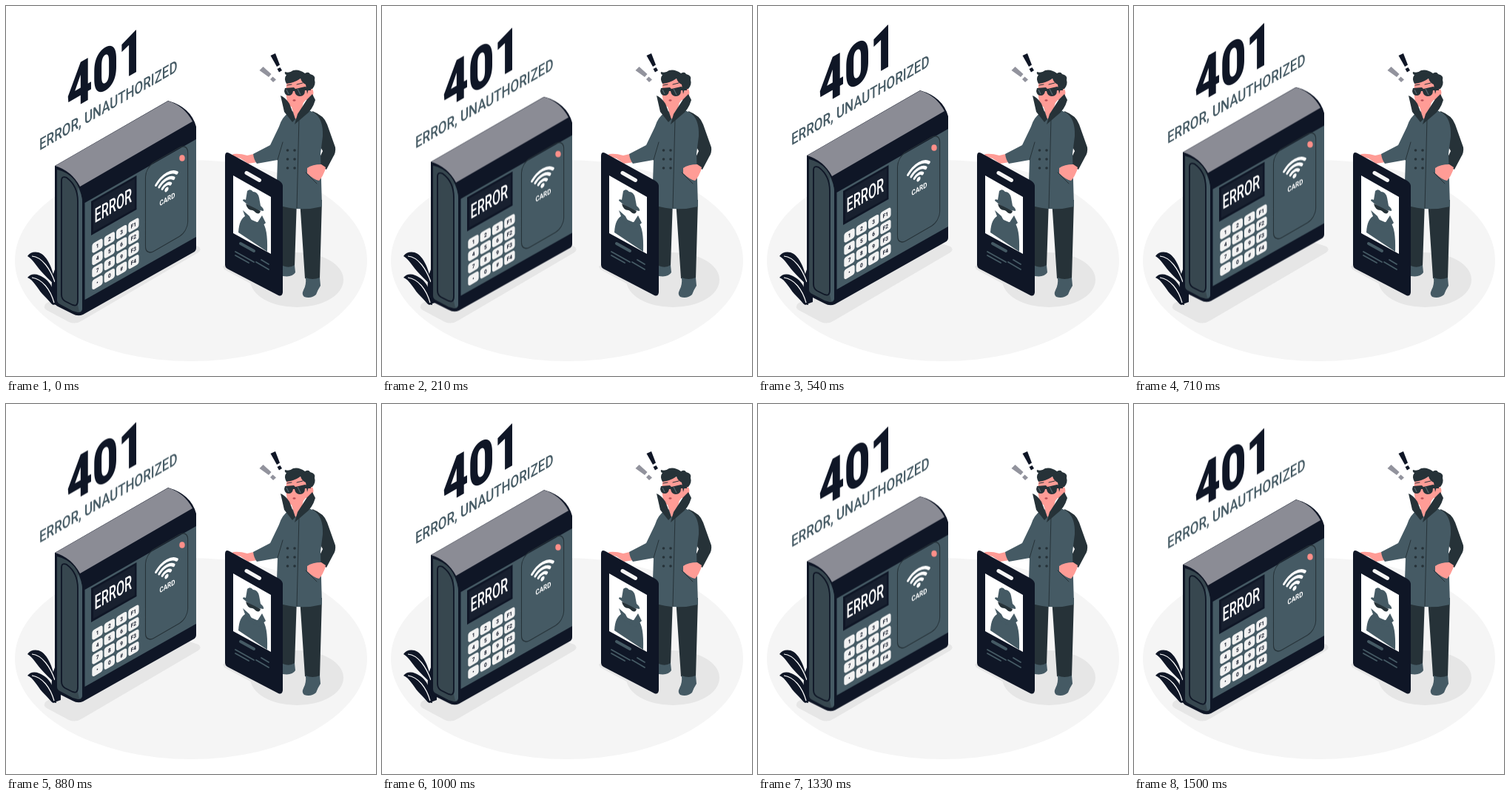
An HTML page that plays this animation: 500x500 px, repeating every 1.54 s.

```html
<!DOCTYPE html>
<html lang="en">
<head>
<meta charset="utf-8">
<title>401</title>
<style>
html, body { margin: 0; width: 100%; height: 100%; overflow: hidden; background: #fff; }
svg { display: block; width: 100vw; height: 100vh; }
text { font-family: Roboto, Arial, sans-serif; font-weight: 500; }
.navy { fill: #0f1626; }
.ink { fill: #263238; }
.slate { fill: #455a64; }
.deep { fill: #37474f; }
.skin { fill: #ff9c96; }
.line { fill: none; stroke: #263238; stroke-width: 1; stroke-linecap: round; stroke-linejoin: round; }
</style>
</head>
<body>
<svg viewBox="0 0 500 500">
  <ellipse cx="250" cy="344" rx="238" ry="136" fill="#f5f5f5"/>
  <g fill="#e6e6e6">
    <path d="M54 402L215 310L260 325Q265 329 260 333L103 425Q94 431 85 427L55 411Q49 407 54 402Z"/>
    <ellipse cx="393" cy="370" rx="63" ry="37"/>
    <path d="M293 352L300 348L374 388L366 394L295 356Z"/>
  </g>

  <g id="plant">
    <path class="navy" d="M67 378C65 360 57 337 44 333Q34 331 29 338C36 342 40 350 47 358Q55 367 67 378Z"/>
    <path class="navy" d="M68 404C67 385 60 370 45 364Q35 360 29 367C37 370 42 381 49 389Q56 396 62 403Z"/>
    <path class="navy" d="M63 404C61 380 60 366 69 350L74 360V400Z"/>
    <path d="M35 338C49 339 60 356 66 373M35 367C49 369 60 383 65 401" fill="none" stroke="#fff" stroke-width="1.2"/>
  </g>

  <g id="title">
    <text class="navy" transform="matrix(.75 -.433 0 1 82 143.5)" font-size="80" style="font-weight:900">401</text>
    <text class="slate" transform="matrix(.77 -.444 0 1 45 195.5)" font-size="22">ERROR, UNAUTHORIZED</text>
  </g>

  <g id="device">
    <path class="navy" d="M66 216L219 128Q250 137 257 163V327Q257 331 253 333L104 417Q97 420 90 416L70 406Q66 404 66 400Z"/>
    <path d="M66.5 216L219 128.5Q241 135 252 156L100 244Q89 223 66.5 216Z" fill="#8b8c95"/>
    <path class="deep" d="M69 221Q98 228 103 262V409Q103 415 97 414L90 412L73 403Q69 401 69 397Z"/>
    <path class="slate" d="M97 245Q102 253 103 264V409Q103 412 99 413L97 404Z"/>
    <path d="M75 236Q75 229 82 232Q97 243 97 264V398Q97 407 90 404L80 399Q75 396 75 390Z" class="deep" stroke="#0f1626" stroke-width="1.8"/>
    <path class="slate" d="M106.5 266L257 180V312L106.5 397Z"/>
    <path class="navy" d="M115 264L176.500 229V275L115 310Z"/>
    <path d="M118 265.500L174 233.500V273.500L118 305Z" fill="#18202f"/>
    <text fill="#fff" transform="matrix(.6 -.346 0 1 119.500 293.500)" font-size="27">ERROR</text>
    <g id="keys"></g>
    <g transform="matrix(.866 -.5 0 1 188.500 218)">
      <rect width="66" height="120" rx="13" fill="none" stroke="#263238" stroke-width="1.2"/>
    </g>
    <g id="waves" transform="matrix(.866 -.5 0 1 217 250)" fill="none" stroke="#fff" stroke-width="4"></g>
    <text fill="#fff" transform="matrix(.8 -.46 0 1 207.500 270.500)" font-size="10" style="font-weight:700">CARD</text>
    <ellipse cx="238" cy="205.500" rx="3.700" ry="4.300" fill="#ff8f89"/>
  </g>

  <g id="marks">
    <path class="navy" d="M357.500 67L364 64L370 79.500L366 82ZM366.500 85L370.500 83L373 87L369 89.500Z"/>
    <path d="M342.500 87L347.500 82L358.500 92L355 96ZM357 99L360.500 95.500L365 99.500L361 103Z" fill="#92939d"/>
  </g>

  <g id="man">
    <path class="ink" d="M371 262H393L390 352Q383 358 374 354ZM397 262H427L424 369Q413 373 404 368Z"/>
    <path class="slate" d="M374 351Q383 355 390 350L391 360Q387 367 374 365ZM405 367Q414 371 424 367L425 378Q421 384 419 390Q412 396 403 393Q399 390 402 384Q406 377 405 367Z"/>
    <path class="skin" d="M339 199L326 202Q316 199 307 200Q304 202 309 204L317 206L327 213L340 211Z"/>
    <path class="skin" d="M427 212L413 216Q405 219 407 226Q412 237 421 236Q428 231 433 217Z"/>
    <path class="ink" d="M414 142Q430 148 434 160L445 191Q446 198 442 204L433 221L420 213L428 196L417 176Z"/>
    <path class="slate" d="M382 144Q373 150 369 163L357 188L334 200Q335 208 339 213L367 208L365 268Q395 279 427 271L425 200L428 176Q429 152 416 144L403 138Z"/>
    <path class="line" d="M367 208L374 184M396 152L393 273M405 225L420 240"/>
    <path class="skin" d="M407 219Q414 214 426 214L432 218Q429 230 423 236Q416 235 407 226Z"/>
    <path class="skin" d="M384 130H402L398 146L391 153Z"/>
    <path class="skin" d="M380 100Q377 114 380 130Q382 137 388 136Q398 137 405 127Q412 127 415 121Q417 112 410 110L408 98Z"/>
    <path class="ink" d="M379 105Q375 98 379 93Q376 92 377 89Q383 91 388 87Q396 85 404 91Q409 88 411 92Q419 94 417 100Q419 106 414 112L409 112L407 119L405 106Q400 104 398 98Q389 104 379 105Z"/>
    <path class="ink" d="M377 111L389 110L391 112L404 109L412 112V114L404 114Q404 122 397 122Q391 122 390 115L388 115Q387 121 382 121Q377 121 376 115Z"/>
    <path d="M379 113L382 119M394 112L398 120" stroke="#52636b" stroke-width="1.300"/>
    <path class="line" d="M380 107L386 106M393 106L401 104"/>
    <ellipse cx="389.500" cy="127.500" rx="2" ry="1.300" fill="#b94e55"/>
    <path class="ink" d="M371 121Q378 124 383 132L391 153L387 157L376 143ZM414 119L418 127Q414 141 404 148L390 160L394 146L407 126Z"/>
    <g id="buttons" class="ink"></g>
  </g>

  <g id="card">
    <path class="navy" d="M296 203Q296 196 302 199L369 236Q374 239 374 244V387Q373 393 368 391L299 355Q296 353 296 350Z"/>
    <path d="M325 225.500L342.500 235.500" stroke="#f5f5f5" stroke-width="5" stroke-linecap="round"/>
    <path fill="#fff" d="M307 229L358 258V335L307 307Z"/>
    <path class="slate" d="M314 306Q315 287 325 283L332 289L339 292L346 292Q354 299 353 332Z"/>
    <path class="slate" d="M324 262L326 250Q330 246 334 251Q340 251 342 259L344 270Q349 274 348 277Q334 276 320 263Q320 260 324 262Z"/>
    <path fill="#fff" d="M324 268L344 278Q344 287 336 289Q326 285 324 268Z"/>
    <path class="ink" d="M324 267L344 277Q342 284 335 277L333 276Q326 276 324 267Z"/>
    <path class="slate" d="M320 276L329 284L336 298L326 292ZM346 283L351 293L342 301L337 297Z"/>
    <g fill="none" stroke="#455a64" stroke-linecap="round">
      <path d="M317 321L335 331" stroke-width="4"/>
      <path d="M310 332L335 346M310 337L328 347M345 343L355 349M338 346L355 356" stroke-width="1.800"/>
    </g>
  </g>
</svg>
<script>
const $ = id => document.getElementById(id);
const labels = ['1', '2', '3', 'F1', '4', '5', '6', 'F2', '7', '8', '9', 'F3', '•', '0', '#', 'F4'];

$('keys').innerHTML = labels.map((label, i) => {
  const col = i % 4, row = i >> 2;
  const x = 123.5 + col * 16.3, y = 324 + row * 16.5 - col * 9.3;
  return `<g transform="matrix(.866 -.5 0 1 ${x} ${y})">
    <rect x="-8.300" y="-6.600" width="16.600" height="13.400" rx="3.500" fill="#f2f2f2"/>
    <text class="navy" y="2.800" font-size="7.500" text-anchor="middle" style="font-weight:700">${label}</text></g>`;
}).join('');

const arc = r => {
  const d = r * Math.SQRT1_2;
  return `<path d="M${-d} ${-d}A${r} ${r} 0 0 1 ${d} ${-d}" stroke-linecap="round"/>`;
};
$('waves').innerHTML = [9, 16, 23].map(arc).join('') +
  '<circle cy="-2" r="3" fill="#fff" stroke="none"/>';

$('buttons').innerHTML = [195, 207, 219].map(y =>
  `<circle cx="380.500" cy="${y}" r="1.800"/><circle cx="390" cy="${y}" r="1.800"/>`).join('');

// Linear rise and fall; the loop begins shortly after the lowest point.
const float = (id, low, high) => $(id).animate(
  [{ transform: `translateY(${low}px)` }, { transform: `translateY(${high}px)` }],
  { duration: 770, delay: -40, iterations: Infinity, direction: 'alternate', easing: 'linear' });

float('title', 0.5, -9.5);
float('device', 1, -19);
</script>
</body>
</html>
```
